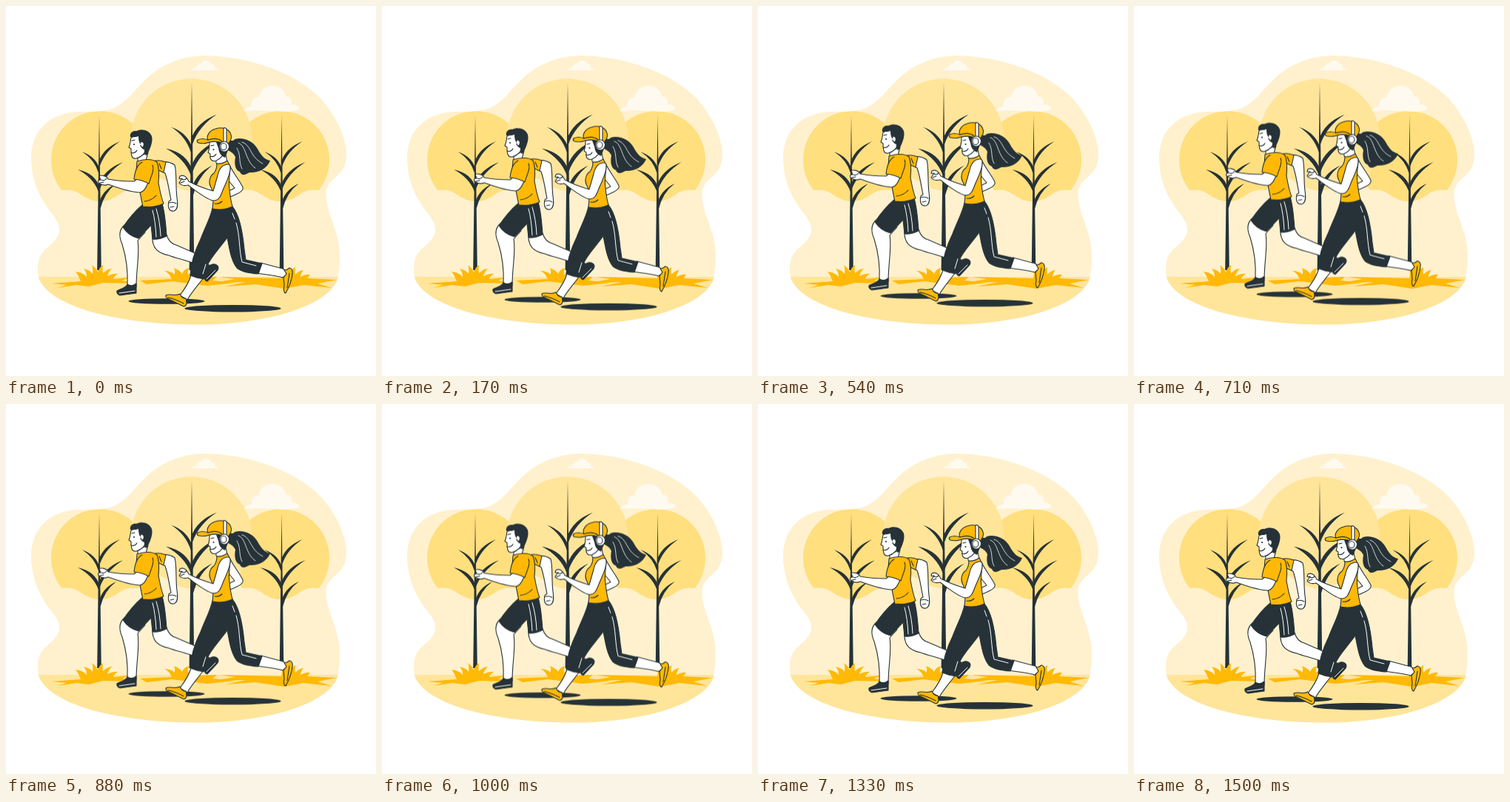
Animation, 500 px wide and 500 px high, one loop 1.54 s. Source, as an HTML page:

```html
<!DOCTYPE html>
<html lang="en">
<head>
<meta charset="utf-8">
<title>Runners in the park</title>
<style>
  html, body { margin: 0; width: 100%; height: 100%; overflow: hidden; background: #fff; }
  svg { display: block; width: 100vw; height: 100vh; }
  .dark { fill: #263238; }
  .gold { fill: #ffb906; }
  .soft { fill: #ffe59a; }
  .foliage { fill: #ffdf7e; }
  .cloud { fill: #fffaf0; }
  .skin { fill: #fff; }
  .line { fill: none; }
  .trim { fill: none; stroke: #fff; stroke-width: 1; }
  .runners path, .runners ellipse { stroke-linecap: round; stroke-linejoin: round; }
  .ink { stroke: #263238; stroke-width: 1.1; }
  .runners { animation: bounce 1540ms -4ms infinite; }
  /* A 1.5 s linear float at 24 steps per second, entered one step after its lowest point. */
  @keyframes bounce {
    0% { transform: translateY(0); animation-timing-function: steps(17, end); }
    45.996% { transform: translateY(-9.444px); animation-timing-function: steps(18, end); }
    94.697% { transform: translateY(.556px); animation-timing-function: step-end; }
    97.403%, 100% { transform: translateY(0); }
  }
</style>
</head>
<body>
<svg viewBox="0 0 500 500">
  <defs>
    <clipPath id="blob">
      <path id="land" d="M34 205C34 171 56 146 94 143C111 142 128 144 143 139C164 131 175 111 193 95C213 78 239 67 270 67C324 68 385 87 421 121C447 146 461 181 460 204C458 231 436 231 433 250C430 272 444 292 449 318C453 342 450 356 448 369C436 403 363 428 270 430.500C170 432 66 412 45 370C41 355 42 340 52 330C61 321 73 314 72 300C70 286 58 278 51 265C40 247 34 228 34 205Z"/>
    </clipPath>
    <path id="crown" d="M-51.700 41A66 66 0 1 1 51.700 41Q37 39 27 46Q14 56 0 56Q-14 56 -27 46Q-37 39 -51.700 41Z"/>
    <g id="tree">
      <path d="M0 -210L2.800 0H-2.800Z"/>
      <path d="M-.8 -146Q5 -165 28 -174Q8 -161 .9 -141ZM-.8 -115Q6 -136 32 -146Q9 -131 1 -110ZM-.8 -88Q3 -108 23 -117Q7 -105 1.500 -83ZM.8 -136Q-4 -153 -23 -160Q-6 -149 -.8 -131ZM.8 -111Q-5 -131 -29 -136Q-8 -125 -1 -106Z"/>
    </g>
  </defs>

  <!-- Scenery -->
  <use href="#land" fill="#fff1ce"/>
  <g clip-path="url(#blob)">
    <use href="#crown" class="foliage" x="127" y="208"/>
    <use href="#crown" class="foliage" x="371" y="208"/>
    <use href="#crown" class="soft" transform="translate(250.500 180) scale(1.240)"/>
    <path class="soft" d="M40 366H455V440H40Z"/>
  </g>
  <g class="cloud">
    <path d="M250 87C251 84 256 85 258 82C259 77 262 79 264 77C267 72 276 73 277 79C281 78 283 82 282 84C285 84 287 85 286 87Z"/>
    <path d="M322 142C323 136 328 138 332 135C331 128 335 123 341 124C343 113 351 108 360 108C371 108 378 115 378 123C384 121 387 127 386 133C392 133 397 136 397 140Q381 144 367 142Q342 140 322 142Z"/>
  </g>
  <g class="dark">
    <use href="#tree" x="126" y="357"/>
    <use href="#tree" x="372.500" y="357"/>
    <use href="#tree" transform="translate(251 357) scale(1.210)"/>
  </g>
  <g class="gold">
    <path d="M62 375L101 372Q97 362 94 359Q104 360 109 366Q109 359 105 355Q114 357 117 362Q118 354 116 350Q122 354 124 360Q126 353 131 350Q130 356 131 361Q137 355 143 355Q138 360 137 365Q146 361 151 362Q145 366 145 369L166 367L157 371L176 375L131 374L112 379L95 377L69 381L82 377Z"/>
    <path d="M181 371L224 369Q220 360 214 358Q223 358 228 363Q229 358 227 354Q235 357 238 362Q240 356 247 354Q245 359 246 363Q253 358 262 358Q256 363 256 367L285 366L279 371L310 374L272 378L224 372L190 376Z"/>
    <path d="M288 366L372 368Q374 360 372 355Q380 359 383 364Q385 356 391 353Q390 359 391 363Q396 357 402 357Q398 361 398 366Q405 362 411 363L407 368L447 370L421 375L440 381L402 377L376 382L337 376L296 379L324 373L281 374L309 369Z"/>
  </g>

  <g class="runners">
    <!-- Shadows -->
    <ellipse class="dark" cx="217" cy="399" rx="51.500" ry="3.800"/>
    <ellipse class="dark" cx="306.500" cy="408.700" rx="65" ry="4.800"/>

    <!-- Man -->
    <g class="ink">
      <path class="skin" d="M209 211C216 210 223 211 228 215C231 225 229 244 231 259C232 266 233 275 227 277C221 278 218 273 220 264L223 262C220 248 219 237 215 226L208 222Z"/>
      <path class="line" d="M220 266Q226 264 230 267M222 272L227 271"/>
      <path class="gold" d="M202 209Q208 208 216 211L213 225L204 221Z"/>
      <path class="skin" d="M198 311L217 309C219 316 222 321 230 323L269 340L273 352L267 357C257 345 235 343 220 337C205 334 197 327 198 311Z"/>
      <path class="dark" d="M270 348Q275 352 279 349C284 348 289 352 286 357L272 372Q268 372 269 366L270 359Z"/>
      <path class="skin" d="M160 296C152 303 153 313 157 322C162 338 165 360 164 379L176 380C176 354 181 335 178 317L188 306Z"/>
      <path class="dark" d="M164 376C162 382 153 382 150 385Q149 389 154 391L176 388L176 375Q170 380 164 376Z"/>
      <path class="dark" d="M184 269Q171 280 158 299Q166 311 179 314L196 296L198 315Q207 316 217 311C216 296 215 281 211 267Z"/>
      <path class="skin" d="M178 204L192 198L189 209Q182 214 178 209Z"/>
      <path class="skin" d="M169 178C168 183 168 187 166 191L169 193C169 202 170 207 176 206C184 204 189 197 191 190L189 180L180 172Z"/>
      <path class="gold" d="M177 210C183 208 197 205 204 211C207 218 207 229 206 239C208 250 210 260 213 267Q200 273 185 271C182 258 179 240 176 224Z"/>
      <path class="skin" d="M178 233L173 237C161 237 148 236 138 234C136 229 128 228 126 230L128 235Q123 235 125 239Q132 244 138 241C152 246 168 252 181 252C187 251 190 244 193 236Z"/>
      <path class="gold" d="M184 211C176 215 174 225 173 234Q184 235 193 240C196 230 201 221 198 215"/>
      <path class="line" d="M129 235Q133 237 136 233M127 239L132 238M187 264Q197 263 203 256M207 213L210 220"/>
    </g>
    <path class="dark" d="M168 177C167 172 171 168 176 169C184 165 194 168 197 176C199 183 195 193 190 202Q186 201 187 194Q183 194 182 187Q179 184 179 176Q174 178 168 177Z"/>
    <path class="skin ink" d="M182 184C186 182 188 187 185 191Q182 191 182 188"/>
    <path class="line ink" d="M170 182L174 181M169 198Q174 200 177 195"/>
    <circle class="dark" cx="173" cy="187" r="1.100"/>
    <path class="trim" d="M198 276Q202 291 203 312M203 274Q208 290 209 311M153 388L174 385M283 357L271 369"/>

    <!-- Woman -->
    <g class="ink">
      <path class="skin" d="M302 215C308 227 317 238 320 245C322 251 309 255 303 258L301 250L309 246L300 235Z"/>
      <path class="skin" d="M344 347L374 355Q379 357 379 363L374 367C362 364 350 363 340 361Z"/>
      <path class="gold" d="M376 357Q380 357 383 354Q388 355 387 362C386 372 382 381 378 388Q374 387 376 378L375 367L379 362Z"/>
      <path class="skin" d="M250 364L267 367C259 378 250 388 245 397L235 391C241 383 247 375 250 364Z"/>
      <path class="gold" d="M235 389C229 393 222 388 216 391C215 395 220 396 226 399L240 406Q246 405 243 395Q238 396 235 389Z"/>
      <path class="dark" d="M279 273Q293 276 306 271C316 283 320 307 322 329L324 343L346 348L341 362C330 361 320 360 312 354C304 344 302 328 299 313C289 327 276 340 272 351L268 369Q258 368 249 364C250 346 256 329 263 315C269 299 276 287 279 273Z"/>
      <path class="skin" d="M283 201L284 212Q289 221 299 211L296 196Z"/>
      <path class="skin" d="M275 184C275 190 275 194 273 198L276 200C275 207 278 211 284 209C291 206 296 199 297 193L294 181Z"/>
      <path class="gold" d="M285 213Q292 214 299 209L303 217C303 227 300 236 302 248C303 258 304 264 306 271Q293 277 279 274C280 264 281 256 278 247C272 238 276 229 281 226C284 222 285 218 285 213Z"/>
      <path class="skin" d="M300 214C293 214 288 220 286 229L280 250C270 247 256 242 247 237C243 229 239 228 235 230L234 233Q236 234 238 233L234 239C237 243 242 243 246 242C257 250 270 261 280 263C288 263 290 257 293 249C297 239 304 227 303 218Q303 214 300 214Z"/>
      <path class="line" d="M238 234Q241 236 244 233M236 239L241 237M282 267Q288 268 292 264"/>
    </g>
    <path class="dark" d="M284 184L296 184Q301 181 307 182C309 178 322 178 330 183C343 190 341 205 357 209C353 220 340 226 329 225C324 228 318 230 316 224C310 222 308 214 310 204Q307 198 300 195L296 205Q288 202 287 192Z"/>
    <path class="trim" d="M314 185C325 188 323 210 337 219M319 184C332 188 329 204 347 213M312 192C318 202 314 211 319 220" style="stroke-width:.8"/>
    <g class="ink">
      <path class="gold" d="M273 181C270 176 275 168 283 166C292 163 302 166 304 174C306 179 302 185 298 188Q287 181 275 184Q267 187 260 185Q257 183 259 181Q265 178 273 181Z"/>
      <path class="line" d="M273 181Q285 177 292 183"/>
      <path class="skin" d="M294 165Q296 164 298 166L298 185H294Z"/>
      <ellipse class="skin" cx="295" cy="190" rx="6.500" ry="7"/>
      <ellipse class="skin" cx="294" cy="190" rx="4" ry="4.500"/>
      <path class="line" d="M277 189L281 188M276 203Q281 205 284 200"/>
    </g>
    <circle class="dark" cx="280.500" cy="194" r="1.100"/>
    <path class="trim" d="M306 280L309 288M311 293C316 309 315 331 319 346L338 351M270 349L266 362"/>
    <path class="line ink" d="M219 394Q229 396 240 402M383 361L380 381"/>
  </g>
</svg>
</body>
</html>
```
